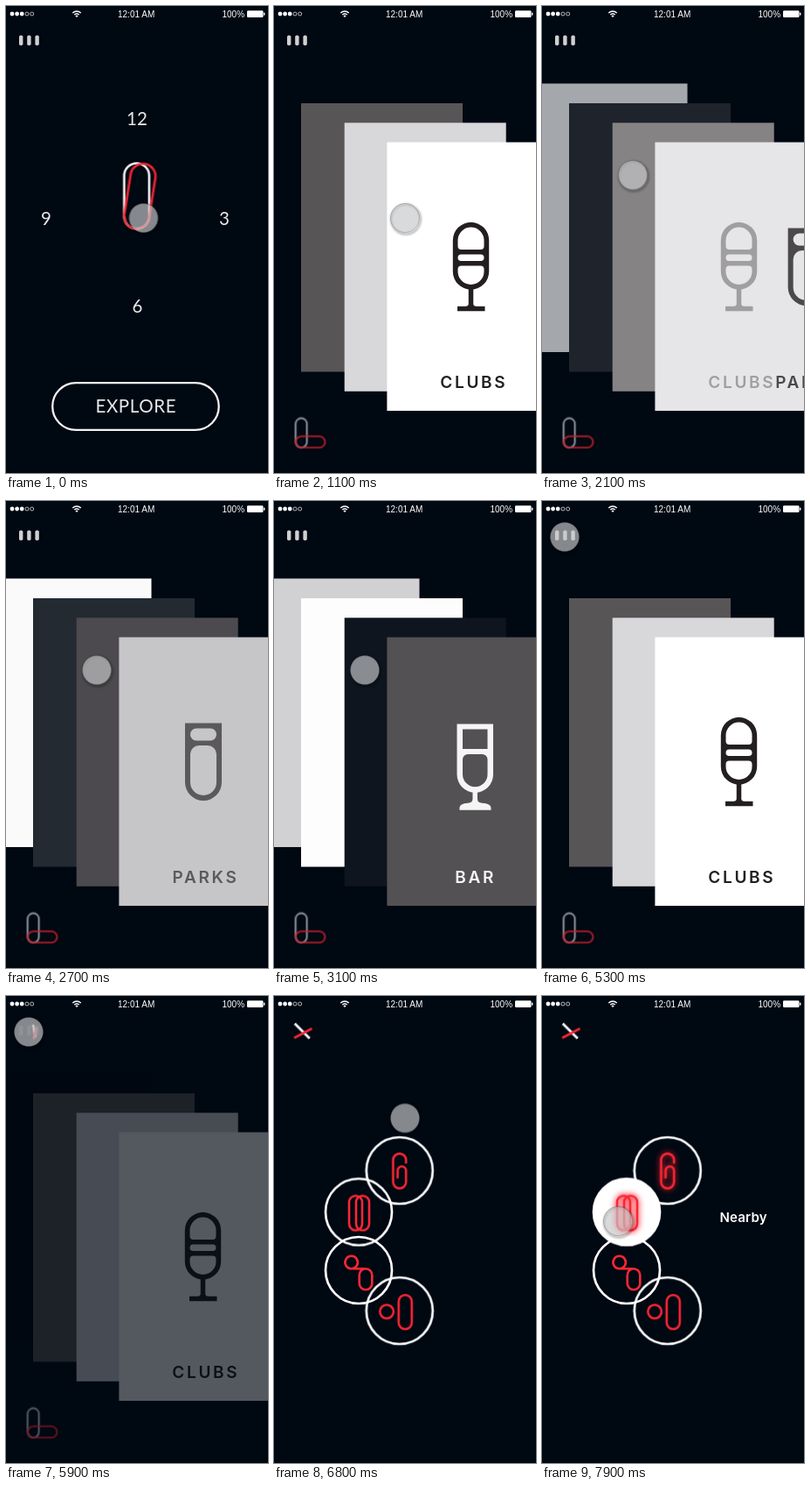
An HTML page for the animation above (8 s loop, 300 px wide and 533 px high).

```html
<!DOCTYPE html>
<html lang="en">
<head>
<meta charset="utf-8">
<title>Night clock</title>
<style>
html, body { margin: 0; width: 100%; height: 100%; overflow: hidden; background: #000812; }
svg { display: block; width: 300px; height: 533px; --n: #000812; --w: #fff; --l: #d8d7d9; --d: #585557; --red: #fb2735; }
svg * { animation: 8s ease infinite; }
text { text-anchor: middle; }

.bar text { font: 10px "Liberation Sans", sans-serif; fill: #fff; text-anchor: start; }
.face { fill: #e8e8ea; font: 20.5px Lato, sans-serif; animation-name: face; }
@keyframes face { 0%, 4.5% { opacity: 1 } 8%, 100% { opacity: 0 } }

/* hands: the clock shrinks into the corner badge */
.hands { fill: none; animation-name: hands; animation-timing-function: ease-in-out; }
.white { stroke: #f4f4f4; animation-name: dim; }
.hand { stroke: var(--red); animation-name: hand; }
@keyframes hands {
  0%, 4.4% { transform: translate(149.6px, 240px) scale(1); stroke-width: 2.6px; opacity: 1 }
  10%, 72% { transform: translate(31.2px, 497.6px) scale(.45); stroke-width: 3.8px; opacity: 1 }
  76%, 100% { transform: translate(31.2px, 497.6px) scale(.45); stroke-width: 3.8px; opacity: 0 }
}
@keyframes dim { 0%, 4.4% { stroke: #f4f4f4 } 10%, 100% { stroke: #a9afb7 } }
@keyframes hand {
  0%, 4.4% { transform: rotate(9deg); stroke: var(--red) }
  10%, 100% { transform: rotate(90deg); stroke: #c9222e }
}

/* cards: the places stay, the colours move on */
.deck { animation-name: deck; }
@keyframes deck {
  0%, 4.6% { transform: translateX(90px); opacity: 0 }
  10%, 72% { transform: none; opacity: 1 }
  76.5%, 100% { transform: none; opacity: 0 }
}
.card { animation-name: tint; }
@keyframes tint {
  0%, 24.3% { fill: var(--a) }
  29.55%, 33.1% { fill: var(--b) }
  38.4% { fill: var(--c) }
  43.6% { fill: var(--e) }
  48.9%, 100% { fill: var(--a) }
}
.label { font: 600 19px Inter, sans-serif; letter-spacing: 2.7px; fill: currentColor; }
.label path { fill-rule: evenodd; }
.label .line { fill: none; stroke: currentColor; stroke-width: 5.5; stroke-linecap: round; }
.clubs { color: #231f20; animation-name: clubs; }
.parks { color: #4b494c; animation-name: parks; }
.wine { color: #fff; animation-name: wine; }
.stage { color: #fff; animation-name: stage; }
@keyframes clubs {
  0%, 24.3% { transform: none; opacity: 1 }
  29.55%, 43.59% { transform: none; opacity: 0 }
  43.6% { transform: translateX(215px); opacity: 1 }
  48.9%, 100% { transform: none; opacity: 1 }
}
@keyframes parks {
  0%, 24.3% { transform: translateX(215px); opacity: 1 }
  29.55%, 33.1% { transform: none; opacity: 1 }
  38.4%, 100% { transform: none; opacity: 0 }
}
@keyframes wine {
  0%, 33.1% { transform: translateX(215px); opacity: 1 }
  38.4% { transform: none; opacity: 1 }
  43.6%, 100% { transform: none; opacity: 0 }
}
@keyframes stage {
  0%, 38.4% { transform: translateX(215px); opacity: 1 }
  43.6% { transform: none; opacity: 1; animation-timing-function: ease-in }
  48.9%, 100% { transform: none; opacity: 0 }
}

/* menu button */
.bars { fill: #d0d0ce; animation-name: bars; }
@keyframes bars { 0%, 72.3% { opacity: 1 } 75%, 100% { opacity: 0 } }
.cross { animation-name: cross; stroke-width: 2.8; }
@keyframes cross { 0%, 72.5% { opacity: 0 } 75%, 100% { opacity: 1 } }
.cross line { animation-name: turn; }
@keyframes turn { 0%, 72.5% { transform: scaleY(.5) } 80%, 100% { transform: rotate(var(--r)) } }

/* menu items */
.item { animation-name: pop; }
@keyframes pop {
  0%, 75% { transform: scale(.5); opacity: 0 }
  82%, 100% { transform: none; opacity: 1 }
}
.ring { fill: #fff; fill-opacity: 0; stroke: #fff; stroke-width: 2.7; }
.icon { fill: none; stroke: var(--red); stroke-width: 2.6; stroke-linecap: round; }
.glow { filter: blur(3px); stroke-width: 5; opacity: 0; }
.first .ring { animation-name: fill1; }
.first .glow { animation-name: glow1; }
.second .ring { animation-name: fill2; }
.second .glow { animation-name: glow2; }
@keyframes fill1 { 0%, 86.5% { fill-opacity: 0 } 89%, 94.4% { fill-opacity: 1 } 97.5%, 100% { fill-opacity: 0 } }
@keyframes fill2 { 0%, 95% { fill-opacity: 0 } 98%, 100% { fill-opacity: 1 } }
@keyframes glow1 { 0%, 87% { opacity: 0 } 92%, 96% { opacity: 1 } 100% { opacity: .5 } }
@keyframes glow2 { 0%, 95% { opacity: 0 } 98.7%, 100% { opacity: .8 } }
.name { font: 600 15px Inter, sans-serif; letter-spacing: .2px; fill: #fff; text-anchor: start; }
.today { animation-name: today; }
.near { animation-name: near; }
@keyframes today { 0%, 88% { opacity: 0 } 93%, 94.4% { opacity: 1 } 96.5%, 100% { opacity: 0 } }
@keyframes near {
  0%, 94.5% { transform: translateX(50px); opacity: 0 }
  98.7%, 100% { transform: none; opacity: 1 }
}

/* finger */
.touch { animation-name: touch; animation-timing-function: ease-in-out; }
@keyframes touch {
  0% { transform: translate(157.5px, 242px) }
  2.5%, 15.4% { transform: translate(150px, 242px) }
  21.25%, 55.5% { transform: translate(104px, 193px) }
  66%, 81.25% { transform: translate(26px, 41px); animation-timing-function: ease-in }
  85% { transform: translate(150px, 139px); animation-timing-function: ease-out }
  88.5%, 94.4% { transform: translate(145px, 203px) }
  98.75%, 100% { transform: translate(87px, 257px) }
}
</style>
</head>
<body>
<svg viewBox="0 0 300 533">
  <defs>
    <path id="six" d="M7.4-9V-12a7.4 7.4 0 0 0-14.8 0V13a7.4 7.4 0 0 0 14.8 0V0a4.8 4.8 0 0 0-9.6 0V8"/>
    <g id="pair"><rect x="-11" y="-18.5" width="15" height="39.5" rx="7.5"/><rect x="-3" y="-18.5" width="15" height="39.5" rx="7.5"/></g>
    <path id="share" d="M-8.5-1.8a7.2 7.2 0 1 1 .3 0H8a7.3 7.3 0 0 1 7.3 7.3V15a7.3 7.3 0 0 1-14.6 0V5.5a7.3 7.3 0 0 1 7.3-7.3"/>
    <g id="ten"><circle cx="-14.7" cy="1" r="7.8"/><rect x="-1" y="-18" width="15" height="39" rx="7.5"/></g>
  </defs>
  <rect width="300" height="533" fill="#000812"/>

  <g class="face">
    <text x="150" y="136">12</text>
    <text x="250" y="250">3</text>
    <text x="150.500" y="349.500">6</text>
    <text x="46" y="250">9</text>
    <rect x="53.200" y="430.200" width="190.500" height="53.600" rx="26.800" fill="none" stroke="#f2f2f2" stroke-width="2.300"/>
    <text x="148.800" y="464" letter-spacing=".6">EXPLORE</text>
  </g>

  <g class="deck">
    <rect class="card" x="-19" y="88.500" width="185.500" height="306.500" style="--a:var(--n);--b:var(--w);--c:var(--l);--e:var(--d)"/>
    <rect class="card" x="31" y="111" width="185" height="306.500" style="--a:var(--d);--b:var(--n);--c:var(--w);--e:var(--l)"/>
    <rect class="card" x="80.700" y="133.300" width="185" height="306.500" style="--a:var(--l);--b:var(--d);--c:var(--n);--e:var(--w)"/>
    <rect class="card" x="129.400" y="155.500" width="185" height="306.500" style="--a:var(--w);--b:var(--l);--c:var(--d);--e:var(--n)"/>

    <g class="label stage">
      <path d="M209 272a20.500 20.500 0 0 1 41 0V330a20.500 20.500 0 0 1-41 0z
        M214.500 272a15 15 0 0 1 30 0v5a4 4 0 0 1-4 4h-22a4 4 0 0 1-4-4z
        M220 287h19a5.500 5.500 0 0 1 5.500 5.500V300h-11v5h11V330a15 15 0 0 1-30 0V305h11v-5h-11V292.500a5.500 5.500 0 0 1 5.500-5.500z"/>
      <circle cx="229.500" cy="329.500" r="5"/>
      <text x="228.500" y="435.500">THEATER</text>
    </g>
    <g class="label wine">
      <path d="M209.500 254.500h41.500V312a20.700 20.700 0 0 1-41.500 0z
        M216 260.500h28.500v22.500h-28.500z
        M222 289h16.500a6 6 0 0 1 6 6V312a14.200 14.200 0 0 1-28.500 0V295a6 6 0 0 1 6-6z"/>
      <path class="line" d="M230.200 331v9q0 7-8 7.500q-7 .5-7 2.500h30.500q0-2-7.500-2.500q-8-.5-8-7.500"/>
      <text x="230.700" y="435.500">BAR</text>
    </g>
    <g class="label parks">
      <path d="M205 253.500h42V321a21 21 0 0 1-42 0z
        M218 259.500h16a7 7 0 0 1 0 14h-16a7 7 0 0 1 0-14z
        M221 279h10a10 10 0 0 1 10 10V321a15 15 0 0 1-30 0V289a10 10 0 0 1 10-10z"/>
      <text x="228.500" y="435.500">PARKS</text>
    </g>
    <g class="label clubs">
      <path d="M204.800 267.500a20.700 20.700 0 0 1 41.400 0V303a20.700 20.700 0 0 1-41.400 0z
        M210.500 267.500a15 15 0 0 1 30 0v6.500a4 4 0 0 1-4 4h-22a4 4 0 0 1-4-4z
        M214.300 283.500h22.400a3.800 3.800 0 0 1 0 7.600h-22.400a3.800 3.800 0 0 1 0-7.600z
        M214.500 296.500h22a4 4 0 0 1 4 4V303a15 15 0 0 1-30 0v-2.500a4 4 0 0 1 4-4z"/>
      <path class="line" d="M225.500 323v17q0 5-6 5.600h-9.500h31.500h-10q-6-.6-6-5.600"/>
      <text x="228.800" y="435.500">CLUBS</text>
    </g>
  </g>

  <g class="hands">
    <rect class="white" x="-14.300" y="-60.500" width="28.600" height="74.800" rx="14.300"/>
    <rect class="hand" x="-14.300" y="-60.500" width="28.600" height="74.800" rx="14.300"/>
  </g>

  <g transform="translate(143.700 199.200)"><g class="item first">
    <circle class="ring" r="38"/>
    <use class="icon glow" href="#six"/><use class="icon" href="#six"/>
  </g></g>
  <g transform="translate(97 246.500)"><g class="item second">
    <circle class="ring" r="38"/>
    <use class="icon glow" href="#pair"/><use class="icon" href="#pair"/>
  </g></g>
  <g transform="translate(97 313)"><g class="item">
    <circle class="ring" r="38"/><use class="icon" href="#share"/>
  </g></g>
  <g transform="translate(143.700 359.200)"><g class="item">
    <circle class="ring" r="38"/><use class="icon" href="#ten"/>
  </g></g>
  <text class="name today" x="204" y="210">Today</text>
  <text class="name near" x="203.500" y="257.500">Nearby</text>

  <g class="bars">
    <rect x="15" y="33.500" width="4.400" height="11.500" rx="1.800"/>
    <rect x="24.200" y="33.500" width="4.400" height="11.500" rx="1.800"/>
    <rect x="33.400" y="33.500" width="4.400" height="11.500" rx="1.800"/>
  </g>
  <g class="cross">
    <g transform="translate(32.300 40)"><line y1="-12" y2="12" stroke="#fff" style="--r:-45deg"/></g>
    <g transform="translate(33.300 42.500)"><line y1="-11.500" y2="11.500" stroke="#fb2735" style="--r:62deg"/></g>
  </g>

  <g class="bar" fill="#fff">
    <circle cx="7" cy="9" r="2.400"/><circle cx="12.600" cy="9" r="2.400"/><circle cx="18.200" cy="9" r="2.400"/>
    <g fill="none" stroke="#fff">
      <circle cx="24" cy="9" r="2" stroke-width=".7"/><circle cx="29.700" cy="9" r="2" stroke-width=".7"/>
      <path d="M76.300 8a6.700 6.700 0 0 1 9.400 0M78.300 10a3.900 3.900 0 0 1 5.400 0" stroke-width="1.500"/>
    </g>
    <path d="M79.400 11.200a2.300 2.300 0 0 1 3.200 0L81 12.900z"/>
    <text x="128" y="12.600">12:01 AM</text>
    <text x="247.500" y="12.600">100%</text>
    <rect x="276" y="5.300" width="18.500" height="7.600" rx="1.200"/>
    <rect x="295" y="7.500" width="1.400" height="3.200" rx=".6"/>
  </g>

  <g class="touch">
    <circle cx="1" cy="1.500" r="16.800" fill="none" stroke="#000" stroke-opacity=".3" stroke-width="2.200" style="filter:blur(1.200px)"/>
    <circle r="16.500" fill="#c7c8ca" fill-opacity=".67" stroke="#555" stroke-opacity=".4" stroke-width=".8"/>
  </g>
</svg>
</body>
</html>
```
